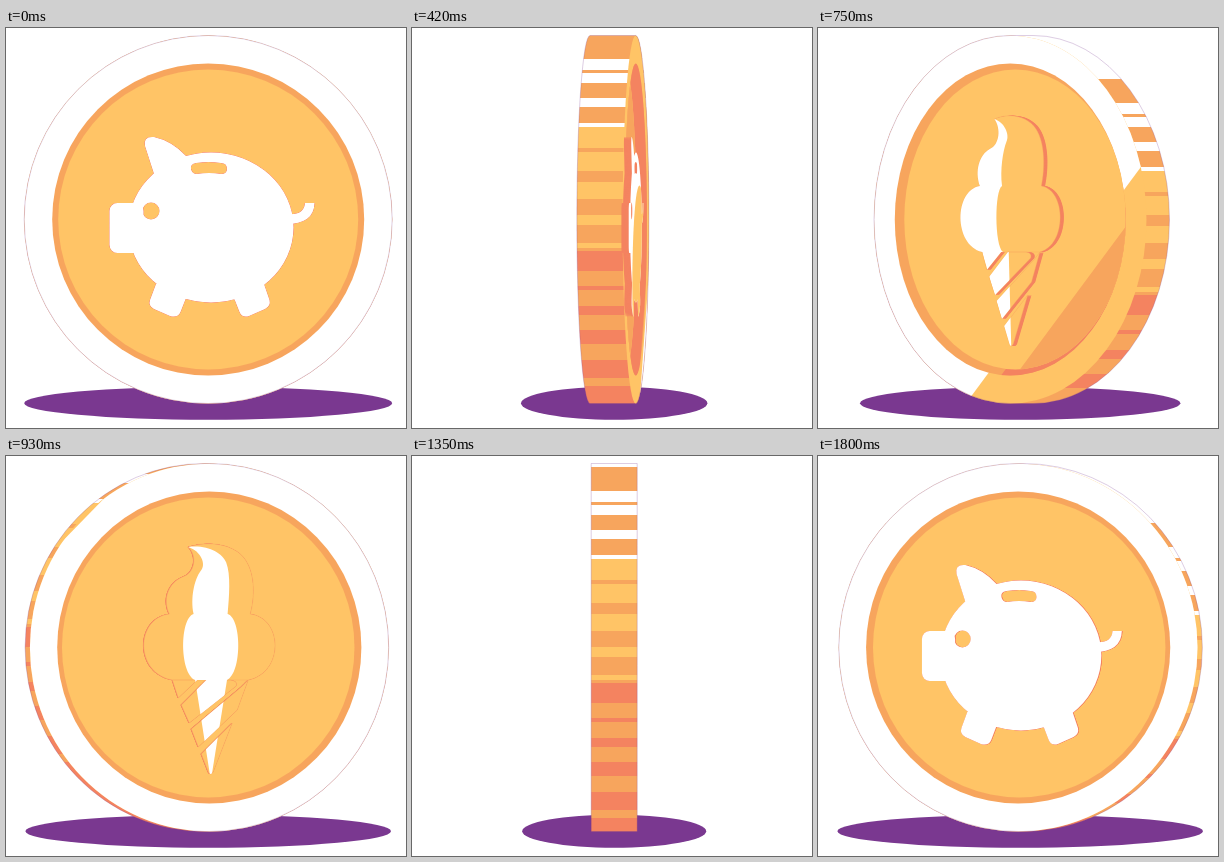
These frames come from a looping animation (400x400 px, 1830 ms). An HTML page with a canvas:

```html
<!DOCTYPE html>
<html lang="en">
<head>
<meta charset="utf-8">
<title>Spinning coin</title>
<style>
  html, body { margin: 0; width: 100%; height: 100%; overflow: hidden; background: #fff; }
  canvas { display: block; width: 400px; height: 400px; }
</style>
</head>
<body>
<canvas id="stage"></canvas>
<script>
const WHITE = '#fff', YELLOW = '#ffc466', ORANGE = '#f7a55d', CORAL = '#f48360', PURPLE = '#7a3890';
const CX = 202.2, CY = 191.5, R = 184, HOLE = 156, FLOOR = 150;
const STEP = 30, STEPS = 61, HALF = 30, EDGE_ON = 15;

const canvas = document.getElementById('stage');
const ctx = canvas.getContext('2d');
const dpr = window.devicePixelRatio || 1;
canvas.width = canvas.height = 400 * dpr;

const lerp = (a, b, f) => a + (b - a) * f;
const clamp = v => Math.min(1, Math.max(0, v));
const smooth = v => v * v * (3 - 2 * v);

// cubic-bezier(.167, 0, .833, .833)
function easeIn(x) {
  let lo = 0, hi = 1, s = 0.5;
  for (let i = 0; i < 24; i++) {
    s = (lo + hi) / 2;
    const u = 1 - s;
    if (0.5 * u * u * s + 2.5 * u * s * s + s ** 3 < x) lo = s; else hi = s;
  }
  return 2.5 * (1 - s) * s * s + s ** 3;
}

function circle(r, x = 0) {
  const p = new Path2D();
  p.arc(x, 0, r, 0, 7);
  return p;
}

// Area on one side of the diagonal x + y = k
function beyond(k, side) {
  const p = new Path2D(), far = 1500 * side;
  p.moveTo(k - 1000, 1000);
  p.lineTo(k + 1000, -1000);
  p.lineTo(k + 1000 + far, -1000 + far);
  p.lineTo(k - 1000 + far, 1000 + far);
  p.closePath();
  return p;
}

function fill(path, color) {
  ctx.fillStyle = color;
  ctx.fill(path);
}

function within(path, draw) {
  ctx.save();
  ctx.clip(path);
  draw();
  ctx.restore();
}

// ---- Piggy bank: parts run clockwise, holes counterclockwise
const pig = new Path2D(
  'M150 152L139 118Q137 108 148 109Q166 113 180 128Z' +
  'M180 270L174.500 284Q172 290 164 288L148 281Q142 278 144 272L150 256L170 250Z' +
  'M258 256L263.500 272Q265 278 259 281L243 288Q236 290 233.500 284L228 270L240 250Z' +
  'M280 186Q298 188 299 175L308.500 175Q308 196 280 196Z' +
  'M190 135Q184 136 185 141Q186 146 191 146Q203 144 215 146Q221 146 221 141Q221 135 215 135Q203 133 190 135Z');
pig.ellipse(205, 199.5, 82.5, 75, 0, 0, Math.PI * 2);
pig.closePath();
pig.roundRect(103.5, 175, 34, 50, 8);
pig.moveTo(153.5, 183);
pig.arc(145, 183, 8.5, 0, Math.PI * 2, true);
pig.closePath();

// ---- Ice cream: two matching side curves, blended to get the glossy streak
const leftSide = [[183, 91], [192, 100], [190, 117], [177, 121], [163, 127], [157, 143], [164, 158],
  [130, 162], [129, 217], [167, 224]];
const rightSide = [[183, 91], [205, 84], [228, 89], [238, 101], [250, 115], [250, 140], [245, 158],
  [278, 162], [279, 217], [243, 224]];

function scoop(from, to) {
  const side = f => leftSide.map(([x, y], i) => [lerp(x, rightSide[i][0], f), lerp(y, rightSide[i][1], f)]);
  const p = new Path2D();
  const trace = pts => {
    for (let i = 1; i < pts.length; i += 3) p.bezierCurveTo(...pts[i], ...pts[i + 1], ...pts[i + 2]);
  };
  const down = side(to), up = side(from).reverse();
  p.moveTo(...down[0]);
  trace(down);
  p.lineTo(...up[0]);
  trace(up);
  p.closePath();
  return p;
}

const cone = new Path2D(
  'M167 224L192 224L173 242Z' +
  'M176 249L201 224L225 224Q233 225 231 230L184 267Z' +
  'M186 273L236 231L243 224L232 254L193 291Z' +
  'M196 298L227 267L208 316Q205 320 203 316Z');
const ice = scoop(0, 1);
ice.addPath(cone);

function drawPig(n, late) {
  fill(pig, WHITE);
  const d = 19 * (late ? n - 20 : n - 8);
  const [x, y, r] = late ? [30, 45, 96] : [-62, -48, 100];
  within(pig, () => {
    const shade = new Path2D();
    shade.arc(CX + x + d, CY + y + d, r, 0, 7);
    fill(shade, YELLOW);
  });
}

function drawIce(n, late) {
  const from = clamp(late ? 0.22 - 0.05 * (30 - n) : 0.3 + 0.0775 * (n - 1));
  const to = clamp(late ? 0.05 + 0.062 * (n - 20) : 0.72 + 0.05 * (n - 1));
  const coneFrom = late ? from : clamp(0.3 + 0.05 * (n - 1));
  const coneTo = late ? clamp(0.25 + 0.042 * (n - 20)) : to;
  fill(ice, YELLOW);
  ctx.strokeStyle = ORANGE;
  ctx.lineWidth = 0.4;
  ctx.stroke(ice);
  fill(scoop(from, to), WHITE);
  within(cone, () => {
    const streak = new Path2D();
    streak.moveTo(lerp(167, 243, coneFrom), 224);
    streak.lineTo(lerp(167, 243, coneTo), 224);
    streak.lineTo(lerp(203, 208, coneTo), 318);
    streak.lineTo(lerp(203, 208, coneFrom), 318);
    fill(streak, WHITE);
  });
}

const symbols = {
  pig: { path: pig, draw: drawPig, axis: CX, stretch: 1 },
  ice: { path: ice, draw: drawIce, axis: 204, stretch: 1.025 }
};

function drawFace(symbol, n, late, x, scale, depth) {
  ctx.save();
  ctx.translate(x, CY);
  ctx.scale(scale, 1);
  const rimLine = late ? -56 + 36 * (n - 20) : 9 + 38 * (n - 8);
  const floorLine = late ? -27 + 38 * (n - 20) : -40 + 36 * (n - 8);
  const lit = late ? -1 : 1;
  const shift = depth / scale;

  const rim = circle(R), hole = circle(HOLE), floor = circle(FLOOR, shift * 0.22);
  fill(rim, YELLOW);
  within(rim, () => fill(beyond(rimLine, lit), WHITE));
  fill(hole, ORANGE);
  within(hole, () => {
    fill(beyond((rimLine + floorLine) / 2, -lit), CORAL);
    fill(floor, YELLOW);
    within(floor, () => fill(beyond(floorLine, -lit), ORANGE));
  });

  ctx.scale(symbol.stretch, 1);
  ctx.translate(-symbol.axis, -CY);
  for (let i = 8; i > 0; i--) {
    ctx.save();
    ctx.translate(shift * 0.16 * i / 8, 0);
    fill(symbol.path, CORAL);
    ctx.restore();
  }
  symbol.draw(n, late);
  ctx.restore();
}

// Band ends down the milled edge, with one colour letter for each band
const bandEnds = [31, 55, 66, 69, 79, 94, 103, 119, 123, 144, 148, 167, 178, 195, 211, 221, 239, 244,
  247, 267, 282, 286, 302, 311, 326, 340, 356, 374, 382, 600];
const bandColors = 'wowowowowyoyoyoyoyococococococ';
const palette = { w: WHITE, y: YELLOW, o: ORANGE, c: CORAL };

function drawEdge(left, right, rx, n) {
  const hull = new Path2D(), q = Math.PI / 2;
  hull.ellipse(left, CY, rx, R, 0, q, 3 * q);
  hull.ellipse(right, CY, rx, R, 0, 3 * q, 5 * q);
  hull.closePath();
  within(hull, () => {
    const slide = 4 * (n - 20);
    let top = -200;
    bandEnds.forEach((end, i) => {
      ctx.fillStyle = palette[bandColors[i]];
      ctx.fillRect(0, top + slide, 400, end - top);
      top = end;
    });
  });
  return hull;
}

function draw(step) {
  const second = step >= HALF;
  let n = step % STEPS;
  if (second) {
    n -= HALF;
    if (n > EDGE_ON) n--;   // the second half turn rests one step edge-on
  }
  const late = n >= EDGE_ON;
  const progress = (late ? HALF - n : n) / EDGE_ON;
  const scale = 1 - easeIn(progress);
  const angle = n * Math.PI / HALF;
  const thick = 46 * Math.sin(angle);
  const mid = CX - Math.sin(2 * angle) * (late ? 1.8 : 6.3);
  const left = mid - thick / 2, right = mid + thick / 2;

  ctx.setTransform(dpr, 0, 0, dpr, 0, 0);
  ctx.clearRect(0, 0, 400, 400);

  const shadow = new Path2D();
  shadow.ellipse(CX, 375.2, R - 92 * smooth(progress), 16.5, 0, 0, 7);
  fill(shadow, PURPLE);

  const hull = drawEdge(left, right, R * scale, n);
  if (scale > 0.005) {
    const symbol = second === late ? symbols.pig : symbols.ice;
    drawFace(symbol, n, late, late ? left : right, scale, late ? thick : -thick);
  }
  ctx.globalAlpha = 0.5;
  ctx.strokeStyle = PURPLE;
  ctx.lineWidth = 0.5;
  ctx.stroke(hull);
  ctx.globalAlpha = 1;
}

const start = performance.now();
function tick() {
  draw(Math.floor((performance.now() - start) / STEP) % STEPS);
  requestAnimationFrame(tick);
}
tick();
</script>
</body>
</html>
```
